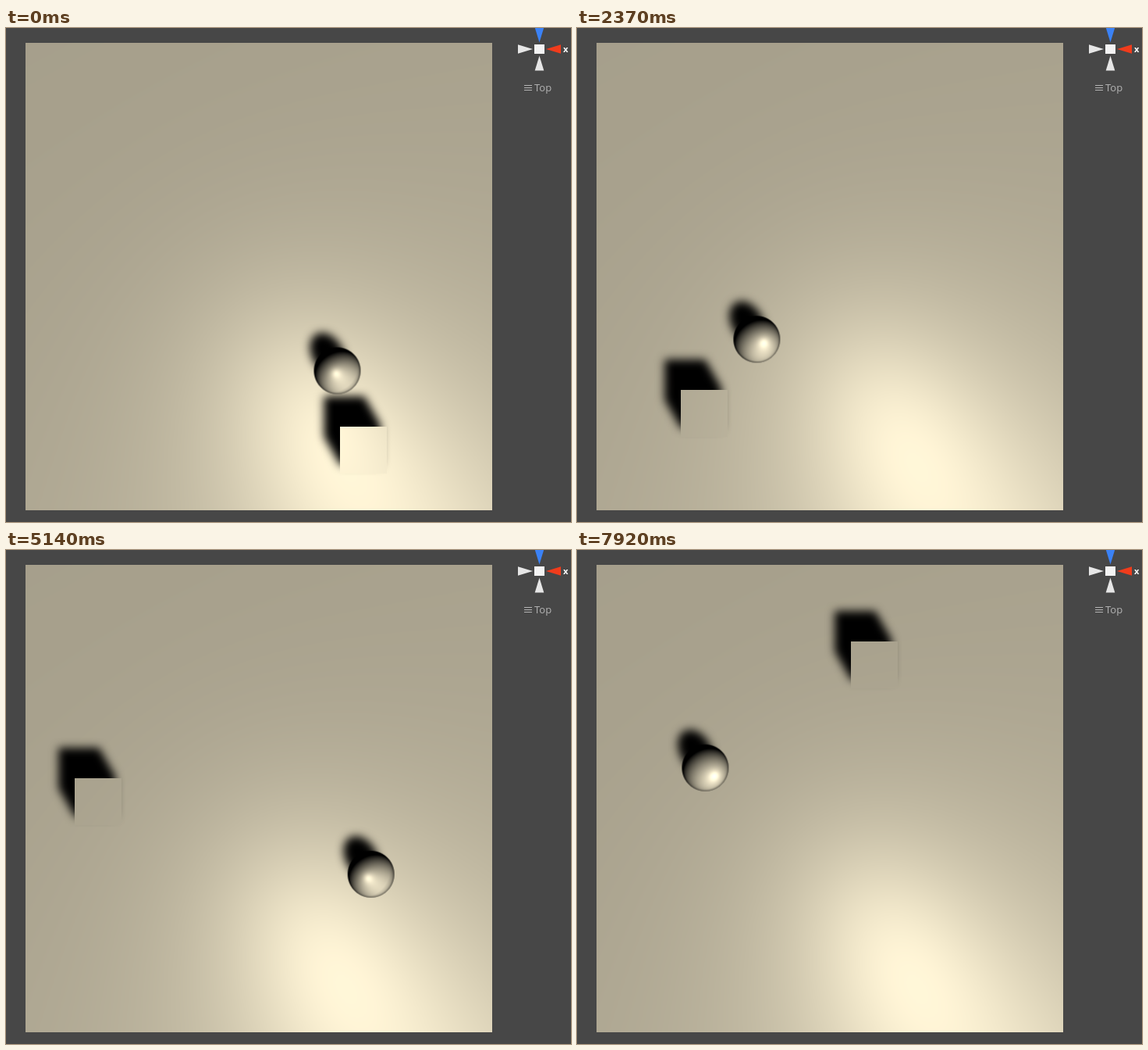
An HTML page with a canvas for the animation above (8000 ms loop, 724 by 632 pixels).

```html
<!DOCTYPE html>
<html lang="en">
<head>
<meta charset="utf-8">
<title>Rolling ball</title>
<style>
  html, body { margin: 0; width: 100%; height: 100%; overflow: hidden; background: #474747; }
  canvas { display: block; }
</style>
</head>
<body>
<canvas id="stage" width="724" height="632"></canvas>
<script>
const LOOP = 8000, FRAMES = 104, STEP = LOOP / FRAMES;
const UNIT = 59.8, RADIUS = UNIT / 2, CUBE = 60, REACH = 1.42 * UNIT;
const FLOOR = { x: 25, y: 19, size: 598 };

// Lighting: x right, y down, z towards the viewer.
const LIGHT = [0.321, 0.557, 0.766];
const TINT = [255, 244.5, 214];
const EYE = [296, 319, 300];
const ALBEDO = 0.785, ROUGH = 0.25, ROUGH2 = ROUGH * ROUGH, GLOSS = 0.21;

// Key points of the ball: time, x, y
const PATH = [
  [0, 424.5, 438.5], [840, 424, 557], [1680, 272.5, 456.5], [2150, 234, 397],
  [2520, 229, 407], [2980, 211.5, 440], [3360, 256, 447], [4130, 420, 450],
  [4600, 472, 461], [5140, 467, 414], [6140, 299, 284], [6760, 190, 236],
  [7400, 138, 257], [7920, 166.5, 279.5]
];
// Corners the cube visits, one after the other
const SPOTS = [[428, 510], [133, 463], [427, 414], [419, 318], [88, 292], [351, 117]];

const ctx = document.getElementById('stage').getContext('2d');

// Lit intensity of a point with unit normal (nx, ny, nz): diffuse plus GGX highlight.
function shade(px, py, pz, nx, ny, nz) {
  const [lx, ly, lz] = LIGHT;
  const nl = nx * lx + ny * ly + nz * lz;
  if (nl <= 0) return 0;
  let vx = EYE[0] - px, vy = EYE[1] - py, vz = EYE[2] - pz;
  const vl = Math.hypot(vx, vy, vz);
  vx /= vl; vy /= vl; vz /= vl;
  const nv = Math.abs(nx * vx + ny * vy + nz * vz);
  const hx = lx + vx, hy = ly + vy, hz = lz + vz;
  const nh = Math.max(0, nx * hx + ny * hy + nz * hz) / Math.hypot(hx, hy, hz);
  const d = 1 - nh * nh * (1 - ROUGH2);
  const vis = 0.5 / (nl * (nv * (1 - ROUGH) + ROUGH) + nv * (nl * (1 - ROUGH) + ROUGH));
  return nl * (ALBEDO + GLOSS * Math.sqrt(vis * ROUGH2) / d);
}

function sprite(size) {
  const canvas = document.createElement('canvas');
  canvas.width = canvas.height = size;
  const c = canvas.getContext('2d');
  return { canvas, c, image: c.createImageData(size, size), size };
}

// pixel(x, y) returns [intensity, alpha]
function fill(s, pixel) {
  const data = s.image.data;
  let i = 0;
  for (let y = 0; y < s.size; y++) {
    for (let x = 0; x < s.size; x++, i += 4) {
      const [v, a] = pixel(x + 0.5, y + 0.5);
      for (let k = 0; k < 3; k++) data[i + k] = v * TINT[k];
      data[i + 3] = a * 255;
    }
  }
  s.c.putImageData(s.image, 0, 0);
  return s.canvas;
}

const flatTop = (s, left, top, z) =>
  fill(s, (x, y) => [shade(left + x, top + y, z, 0, 0, 1), 1]);

function ballImage(s, cx, cy) {
  const half = s.size / 2;
  return fill(s, (x, y) => {
    const dx = x - half, dy = y - half, r = Math.hypot(dx, dy);
    const alpha = Math.max(0, Math.min(1, RADIUS - r + 0.5));
    if (!alpha) return [0, 0];
    const k = 1 / Math.max(RADIUS, r);
    const nx = dx * k, ny = dy * k;
    const nz = Math.sqrt(Math.max(0, 1 - nx * nx - ny * ny));
    const rim = Math.min(1, 0.5 + 1.2 * nz);
    return [rim * shade(cx + dx, cy + dy, RADIUS * (1 + nz), nx, ny, nz), alpha];
  });
}

// Offset on the floor of the shadow cast from height z
const cast = z => [-LIGHT[0] * z / LIGHT[2], -LIGHT[1] * z / LIGHT[2]];

function drawShadows([x, y], [left, top]) {
  const inset = 4, side = CUBE - 2 * inset;
  ctx.save();
  ctx.filter = 'blur(6px)';
  ctx.fillStyle = '#000';
  ctx.beginPath();
  for (let z = 0.15 * UNIT; z <= UNIT; z++) {
    const [dx, dy] = cast(z);
    ctx.rect(left + inset + dx, top + inset + dy, side, side);
  }
  ctx.fill();
  const [dx, dy] = cast(RADIUS);
  ctx.beginPath();
  ctx.ellipse(x + dx, y + dy, 29, 20, Math.atan2(dy, dx), 0, Math.PI * 2);
  ctx.fill();
  ctx.restore();
}

function drawGizmo() {
  ctx.save();
  ctx.translate(683.5, 27);
  for (const color of ['#f03c1c', '#e6e6e6', '#e6e6e6', '#3b82f6']) {
    ctx.fillStyle = color;
    ctx.beginPath();
    ctx.moveTo(8.5, 0);
    ctx.lineTo(27.5, -5.8);
    ctx.lineTo(27.5, 5.8);
    ctx.fill();
    ctx.rotate(Math.PI / 2);
  }
  ctx.fillStyle = '#f4f4f4';
  ctx.fillRect(-6.5, -6, 13, 12);
  ctx.restore();
  ctx.fillStyle = '#fff';
  ctx.font = 'bold 11px "Open Sans", sans-serif';
  ctx.fillText('x', 714, 30.5);
  ctx.fillStyle = '#b4b4b4';
  for (let y = 73; y < 80; y += 3) ctx.fillRect(664, y, 10, 1);
  ctx.font = '13px "Open Sans", sans-serif';
  ctx.fillText('Top', 677, 81);
}

const secant = (a, b, k) => (b[k] - a[k]) / (b[0] - a[0]);

// Velocity at a key point; the two ends keep a constant acceleration.
function slope(i, k) {
  const last = PATH.length - 1;
  if (i === 0) return 2 * secant(PATH[0], PATH[1], k) - slope(1, k);
  if (i === last) return 2 * secant(PATH[last - 1], PATH[last], k) - slope(last - 1, k);
  return secant(PATH[i - 1], PATH[i + 1], k);
}

function ballAt(t) {
  let i = 0;
  while (i < PATH.length - 2 && PATH[i + 1][0] <= t) i++;
  const a = PATH[i], b = PATH[i + 1], span = b[0] - a[0];
  const u = Math.min(1, (t - a[0]) / span), w = 1 - u;
  return [1, 2].map(k =>
    a[k] * w * w * (1 + 2 * u) + b[k] * u * u * (3 - 2 * u) +
    span * u * w * (w * slope(i, k) - u * slope(i + 1, k)));
}

// The cube jumps to its next spot whenever the ball comes within reach.
let spot = 0;
const frames = Array.from({ length: FRAMES }, (_, i) => {
  const ball = ballAt(Math.max(0, i * STEP - 20));
  const [left, top] = SPOTS[spot];
  if (Math.hypot(left + CUBE / 2 - ball[0], top + CUBE / 2 - ball[1]) < REACH)
    spot = Math.min(spot + 1, SPOTS.length - 1);
  return { ball, cube: SPOTS[spot] };
});

const floor = flatTop(sprite(FLOOR.size), FLOOR.x, FLOOR.y, 0);
const cubeSprite = sprite(CUBE), ballSprite = sprite(64);

function draw({ ball, cube }) {
  ctx.fillStyle = '#474747';
  ctx.fillRect(0, 0, 724, 632);
  ctx.drawImage(floor, FLOOR.x, FLOOR.y);
  drawShadows(ball, cube);
  ctx.drawImage(flatTop(cubeSprite, ...cube, UNIT), ...cube);
  ctx.drawImage(ballImage(ballSprite, ...ball), ball[0] - 32, ball[1] - 32);
  drawGizmo();
}

const start = performance.now();
let shown = -1;
function tick() {
  const t = (performance.now() - start) % LOOP;
  const frame = Math.min(FRAMES - 1, Math.floor((t + 26) / STEP));
  if (frame !== shown) draw(frames[shown = frame]);
  requestAnimationFrame(tick);
}
tick();
</script>
</body>
</html>
```
